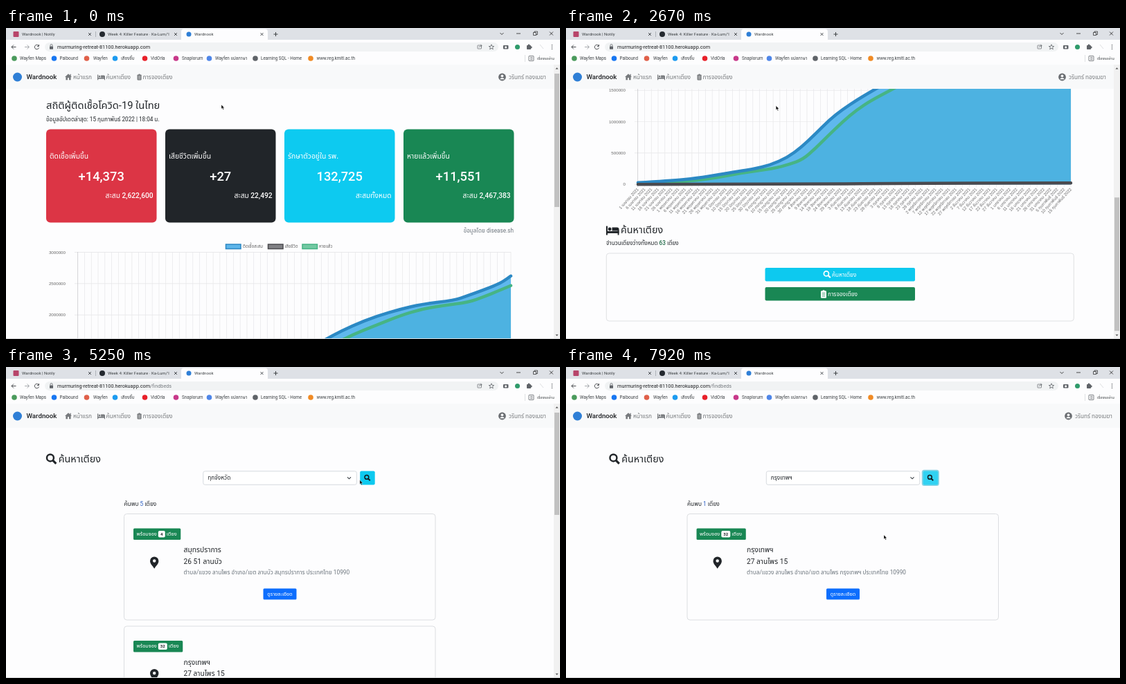
Animation, 800 px wide and 450 px high, one loop 8 s. Source, as an HTML page with a canvas:

```html
<!DOCTYPE html>
<html lang="th">
<head>
<meta charset="utf-8">
<title>Wardnook</title>
<style>
html, body { margin: 0; width: 100%; height: 100%; overflow: hidden; background: #fdfdfe; }
canvas { display: block; width: 800px; height: 450px; }
</style>
</head>
<body>
<canvas id="stage" width="800" height="450"></canvas>
<script>
const LOOP = 8000;
const ctx = document.getElementById('stage').getContext('2d');
const SANS = 'Roboto, "Noto Sans Thai", "Noto Sans", sans-serif';
const INK = '#212529', GREY = '#777a7d', CYAN = '#0dc9ef', GREEN = '#198754';
const HOST = 'murmuring-retreat-81100.herokuapp.com';

// Key times: page swap, results, list open, item picked, search pressed, filtered
const PAGE = 4330, LOADED = 4800, OPEN = 5750, PICK = 6450, PRESS = 6900, FILTER = 7050;

const POINTER = [[0, 311, 111], [420, 311, 111], [750, 303, 112], [2670, 303, 112],
  [3200, 410, 384], [3500, 432, 358], [3900, 432, 358], [4330, 551, 247], [4600, 551, 247],
  [5150, 522, 164], [5350, 500, 163], [5700, 376, 169], [6080, 376, 169], [6300, 345, 190],
  [6450, 345, 190], [6750, 518, 162], [7650, 523, 162], [7920, 459, 243]];
const SCROLL = [[1500, 0], [1580, 7], [1750, 70], [2080, 221.5], [2170, 255], [2250, 270], [2500, 370.5]];

const PROVINCES = ('ทุกจังหวัด กรุงเทพฯ กระบี่ กาญจนบุรี กาฬสินธุ์ กำแพงเพชร ขอนแก่น จันทบุรี ฉะเชิงเทรา ' +
  'ชลบุรี ชัยนาท ชัยภูมิ ชุมพร เชียงใหม่ เชียงราย ตรัง ตราด ตาก นครนายก นครปฐม').split(' ');
const MONTHS = ('มกราคม กุมภาพันธ์ มีนาคม เมษายน พฤษภาคม มิถุนายน กรกฎาคม สิงหาคม กันยายน ' +
  'ตุลาคม พฤศจิกายน ธันวาคม').split(' ');

// x position and height above the zero line
const INFECTED = [[104, 2.5], [150, 5], [190, 9], [220, 14], [250, 19], [270, 22], [295, 28], [320, 39],
  [340, 54], [360, 73], [380, 93], [400, 109], [420, 122], [440, 134], [470, 151], [500, 166], [535, 180],
  [570, 190], [600, 197], [648, 203], [665, 209], [690, 218], [708, 225], [718, 230], [729, 238]];
const RECOVERED = [[104, 1.5], [150, 2.5], [190, 6], [220, 10], [250, 16], [300, 23], [322, 29], [342, 36],
  [360, 52], [380, 72], [400, 91], [420, 108], [440, 121], [470, 137], [500, 153], [535, 167], [570, 181],
  [600, 190], [630, 195], [668, 200], [690, 208], [710, 216], [729, 224]];
const DEATHS = [[104, 0], [340, 0], [450, 1.5], [729, 2]];

function track(keys, t) {
  if (t <= keys[0][0]) return keys[0].slice(1);
  for (let i = 1; i < keys.length; i++) {
    const a = keys[i - 1], b = keys[i];
    if (t < b[0]) return a.slice(1).map((v, k) => v + (b[k + 1] - v) * (t - a[0]) / (b[0] - a[0]));
  }
  return keys[keys.length - 1].slice(1);
}

function text(str, x, y, size, color = INK, align = 'left', weight = 400, family = SANS) {
  ctx.font = `${weight} ${size}px ${family}`;
  ctx.fillStyle = color;
  ctx.textAlign = align;
  ctx.fillText(str, x, y + size * .34);
  return x + ctx.measureText(str).width;
}
function rect(x, y, w, h, fill, r = 0, stroke, line = .7) {
  ctx.beginPath();
  ctx.roundRect(x, y, w, h, r);
  if (fill) { ctx.fillStyle = fill; ctx.fill(); }
  if (stroke) { ctx.strokeStyle = stroke; ctx.lineWidth = line; ctx.stroke(); }
}
function dot(x, y, r, fill, stroke, line = 1) {
  ctx.beginPath();
  ctx.arc(x, y, r, 0, 7);
  if (fill) { ctx.fillStyle = fill; ctx.fill(); }
  if (stroke) { ctx.strokeStyle = stroke; ctx.lineWidth = line; ctx.stroke(); }
}
// SVG path data drawn at an offset
function shape(d, x, y, fill, stroke, line = 1) {
  ctx.save();
  ctx.translate(x, y);
  const p = new Path2D(d);
  if (fill) { ctx.fillStyle = fill; ctx.fill(p); }
  if (stroke) { ctx.strokeStyle = stroke; ctx.lineWidth = line; ctx.stroke(p); }
  ctx.restore();
}

function lens(x, y, s, color) {
  dot(x - s * .1, y - s * .1, s * .32, null, color, s * .16);
  shape(`M${s * .14} ${s * .14}L${s * .44} ${s * .44}`, x, y, null, color, s * .2);
}
function bed(x, y, s, color) {
  rect(x, y - s * .32, s * .11, s * .7, color);
  rect(x, y + s * .08, s, s * .16, color);
  rect(x + s * .9, y, s * .1, s * .38, color);
  dot(x + s * .28, y - s * .08, s * .13, color);
  rect(x + s * .46, y - s * .22, s * .54, s * .28, color, [0, s * .15, 0, 0]);
}
function clipboard(x, y, s, color, lines) {
  rect(x, y - s * .45, s * .76, s, color, s * .1);
  rect(x + s * .24, y - s * .55, s * .28, s * .2, color, s * .08);
  for (let i = 0; i < 3; i++) rect(x + s * .16, y - s * .17 + i * s * .21, s * .44, s * .07, lines);
}

function browser(t) {
  const findPage = t >= PAGE;
  rect(0, 0, 800, 17, '#dee1e6');
  rect(0, 17, 800, 36, '#fdfdfe');
  rect(253, 1.5, 125, 17, '#fdfdfe', [4, 4, 0, 0]);
  rect(10.5, 5, 8, 8, '#b8456a', 1);
  dot(139, 9, 4, '#24292f');
  dot(264, 9, 3.5, '#2f7fd6');
  text('Wardnook | Notily', 23, 9, 6.1, '#3c4043');
  text("Week 4: Killer Feature · Ka-Lum/'l", 147, 9, 6.1, '#3c4043');
  text('Wardnook', 272, 9, 6.1, '#3c4043');
  rect(129, 5, .7, 8, '#9aa0a6');
  for (const x of [121, 245, 369.5]) shape('M-2-2L2 2M2-2L-2 2', x, 9, null, '#3c4043', .9);
  shape('M-3 0H3M0-3V3', 389.5, 9, null, '#3c4043');
  shape('M-2.5-1L0 1.5L2.5-1', 716, 8, null, '#333', .9);
  shape('M-3 0H3', 740, 8, null, '#222', .8);
  rect(761.5, 6.5, 4, 4, null, 0, '#222');
  shape('M763 6.5V5H767.5V9.5H765.5', 0, 0, null, '#222', .7);
  shape('M-2.5-2.5L2.5 2.5M2.5-2.5L-2.5 2.5', 787.5, 8, null, '#222', .8);

  shape('M3.5 0H-3M0-3L-3 0L0 3', 11, 27.5, null, '#4a4d51');
  shape('M-3.5 0H3M0-3L3 0L0 3', 30.5, 27.5, null, '#a8abaf');
  shape('M2.5-2A3.2 3.2 0 1 0 3.1 1M3-3.5V-1H.5', 44.5, 27.5, null, '#4a4d51');
  rect(56, 21, 655, 13, '#f1f3f4', 6.5);
  rect(63, 26.5, 5, 4.2, '#5f6368', .5);
  shape('M64 26.5V25A1.5 1.5 0 0 1 67 25V26.5', 0, 0, null, '#5f6368', .8);
  const end = text(HOST, 74, 27.5, 7.3, '#202124');
  if (findPage) text('/findbeds', end, 27.5, 7.3, '#777b80');
  rect(681, 25, 5.5, 5, null, .5, '#5f6368');
  shape('M683 28Q684 25.5 687 25.5M685.5 24L687.3 25.5L685.5 27', 0, 0, null, '#5f6368', .7);
  shape('M0-3.7L1-1.1L3.7-1L1.6.7L2.3 3.3L0 1.8L-2.3 3.3L-1.6.7L-3.7-1L-1-1.1Z', 701, 27.5, null, '#5f6368', .8);
  rect(718, 25, 7.5, 5.5, '#5f6368', 1);
  dot(721.7, 27.8, 1.6, '#fff');
  dot(738.5, 27.5, 3.5, findPage && t < LOADED ? '#9a9da1' : '#2f9b6b');
  rect(752, 25, 6, 6, '#5f6368', .8);
  dot(755, 24.8, 1.4, '#5f6368');
  dot(758.3, 28, 1.4, '#5f6368');
  shape('M-2-3L3 3', 773, 27, null, '#d5d7da', .8);
  for (const y of [24.7, 27.5, 30.3]) dot(788.5, y, .8, '#5f6368');

  const marks = [[12, '#4a9a5c', 20, 'Wayfen Maps'], [69.5, '#1877f2', 77.5, 'Palbound'],
    [116.5, '#e0604a', 126, 'Wayfen'], [157.5, '#1d9bf0', 166, 'เสียงจิ๊บ'], [200.5, '#e8202a', 209, 'VidOrla'],
    [245.5, '#c8398a', 254, 'Snaplorum'], [293.5, '#4f86e8', 302, 'Wayfen แปลภาษา'],
    [360, '#5f6368', 368, 'Learning SQL - Home'], [440, '#f08a24', 448.5, 'www.reg.kmitl.ac.th']];
  for (const [x, color, tx, label] of marks) {
    dot(x, 44, 3.8, color);
    text(label, tx, 44, 6.3, '#3c4043');
  }
  rect(749, 39, .7, 10, '#d0d3d7');
  rect(755, 40.5, 7, 7, null, .5, '#5f6368', .8);
  shape('M757 42.5H760.5M757 44H760.5M757 45.5H760.5', 0, 0, null, '#5f6368', .6);
  text('เรื่องรออ่าน', 767, 44, 5.5, '#3c4043');
}

function navbar(dx) {
  rect(0, 53, 800, 35, '#f8f9fa');
  dot(16.5, 71, 6.5, '#2f7fd6');
  text('Wardnook', 29.5, 70.5, 9.7, '#1f2124', 'left', 500);
  shape('M0-4.8L5 0H3.6V4.2H1V1H-1V4.2H-3.6V0H-5ZM2.5-4.3H3.8V-1H2.5Z', 90, 71, GREY);
  text('หน้าแรก', 97, 71, 8.3, GREY);
  bed(132, 71, 11, GREY);
  text('ค้นหาเตียง', 144.5, 71, 8.3, GREY);
  clipboard(189.5, 71, 8, GREY, '#f8f9fa');
  text('การจองเตียง', 197.5, 71, 8.3, GREY);
  dot(716.5 + dx, 71, 5.4, '#6b6e72');
  dot(716.5 + dx, 69.3, 1.9, '#f8f9fa');
  shape('M-3.2 3.2A3.3 2.8 0 0 1 3.2 3.2Z', 716.5 + dx, 71, '#f8f9fa');
  text('วรินทร์ ทองเมฆา', 726 + dx, 71, 8.2, GREY);
}

function scrollbar(top, height) {
  rect(791, 53, 9, 397, '#f1f1f1');
  rect(792, top, 7, height, '#c1c1c1');
  shape('M-2 1L0-1.3L2 1Z', 795.5, 58.5, '#505050');
  shape('M-2-1L0 1.3L2-1Z', 795.5, 444.5, '#505050');
}

function curve(points, base) {
  const p = points.map(([x, h]) => [x, base - h]);
  ctx.lineTo(...p[0]);
  for (let i = 1; i < p.length - 1; i++) {
    const [x, y] = p[i], [nx, ny] = p[i + 1];
    ctx.quadraticCurveTo(x, y, (x + nx) / 2, (y + ny) / 2);
  }
  ctx.lineTo(...p[p.length - 1]);
}
function series(points, base, fill, stroke) {
  if (fill) {
    ctx.beginPath();
    ctx.moveTo(104, base);
    curve(points, base);
    ctx.lineTo(729, base);
    ctx.fillStyle = fill;
    ctx.fill();
  }
  if (!stroke) return;
  ctx.beginPath();
  curve(points, base);
  ctx.lineWidth = 4.5;
  ctx.lineCap = ctx.lineJoin = 'round';
  ctx.strokeStyle = stroke;
  ctx.stroke();
  ctx.lineCap = 'butt';
  ctx.lineJoin = 'miter';
}

function chart() {
  const base = 596.8, step = 45.4, gap = 625.3 / 64, font = '"Liberation Sans", "Noto Sans Thai", sans-serif';
  [['ติดเชื้อสะสม', 317.5, 342, '#5db5ea', '#2c87c2'], ['เสียชีวิต', 378.5, 402.5, '#808084', '#4b4b4f'],
    ['หายแล้ว', 428, 452, '#72c9a2', '#45b384']].forEach(([label, x, tx, fill, stroke]) => {
    rect(x, 313, 21.5, 6.5, fill, 0, stroke, 1.5);
    text(label, tx, 316, 6.1, '#666', 'left', 400, font);
  });
  for (let i = 0; i <= 6; i++) {
    rect(99, base - i * step - .35, 630, .7, '#e3e3e5');
    text(String(i * 500000), 86, base - i * step, 6.2, '#666', 'right', 400, font);
  }
  for (let i = 0; i <= 64; i++) {
    const x = 103.7 + i * gap;
    rect(x - .35, 324, .7, base - 320, i ? '#e6e6e8' : '#c4c4c6');
    const day = new Date(2021, 3, 1 + i * 5);
    ctx.save();
    ctx.translate(x, base + 6);
    ctx.rotate(-.83);
    text(`${day.getDate()} ${MONTHS[day.getMonth()]} ${day.getFullYear()}`, 0, 0, 6, '#666', 'right', 400, font);
    ctx.restore();
  }
  series(INFECTED, base, '#5fb8ed');
  series(RECOVERED, base, '#4db2e1', '#46b484');
  series(INFECTED, base, null, '#2c89c4');
  series(DEATHS, base, null, '#4a4a4f');
}

function home(t, cx, cy) {
  const [scroll] = track(SCROLL, t);
  ctx.save();
  ctx.translate(0, -scroll);
  text('สถิติผู้ติดเชื้อโควิด-19 ในไทย', 58, 112.4, 14.7);
  text('ข้อมูลอัปเดตล่าสุด: 15 กุมภาพันธ์ 2022 | 18:04 น.', 58, 132, 8.2);
  [['#dc3545', 'ติดเชื้อเพิ่มขึ้น', '+14,373', 'สะสม 2,622,600'],
    ['#212529', 'เสียชีวิตเพิ่มขึ้น', '+27', 'สะสม 22,492'],
    ['#0dcaf0', 'รักษาตัวอยู่ใน รพ.', '132,725', 'สะสมทั้งหมด'],
    ['#198754', 'หายแล้วเพิ่มขึ้น', '+11,551', 'สะสม 2,467,383']].forEach(([color, label, value, total], i) => {
    const x = 58 + i * 172;
    rect(x, 146.5, 159.5, 135, color, 6);
    text(label, x + 5, 185, 10.4, '#fff', 'left', 500);
    text(value, x + 79.7, 214.5, 18.3, '#fff', 'center', 500);
    text(total, x + 154.5, 242.5, 10.2, '#fff', 'right', 500);
  });
  text('ข้อมูลโดย disease.sh', 733, 293, 8.2, '#6c757d', 'right');
  chart();
  bed(58, 663, 18.5, INK);
  text('ค้นหาเตียง', 79, 663, 14.3);
  let x = text('จำนวนเตียงว่างทั้งหมด ', 58, 682, 8.2);
  x = text('63', x, 682, 8.2, '#226b49', 'left', 500);
  text(' เตียง', x, 682, 8.2);
  rect(58.3, 696.5, 675, 98, null, 4, '#dcdee0', .9);
  const over = y => cx > 288 && cx < 504 && cy + scroll > y && cy + scroll < y + 20;
  rect(287.5, 717.5, 216.5, 19.5, over(717.5) ? '#31d2f2' : CYAN, 2);
  lens(377, 727, 11, '#fff');
  text('ค้นหาเตียง', 384, 727.5, 8.3, '#fff');
  rect(287.5, 745.5, 216.5, 19.5, over(745.5) ? '#157347' : GREEN, 2);
  clipboard(368, 755.5, 10.5, '#fff', GREEN);
  text('การจองเตียง', 378, 755.5, 8.3, '#fff');
  ctx.restore();
  navbar(0);
  scrollbar(66 + scroll * .484, 193);
}

function bedCard(y, beds, province, street, address) {
  const x = 170.5;
  rect(x, y, 449.5, 153.5, '#fdfdfe', 4, '#d9dbde', .9);
  ctx.font = `500 7.3px ${SANS}`;
  const before = ctx.measureText('พร้อมจอง').width, after = ctx.measureText('เตียง').width;
  const chip = beds > 9 ? 13 : 10;
  rect(x + 13.5, y + 21, before + after + chip + 14, 16.5, GREEN, 1.5);
  let pos = text('พร้อมจอง', x + 18, y + 29, 7.3, '#fff', 'left', 500) + 2;
  rect(pos, y + 24.5, chip, 9.5, '#fff', 2);
  text(String(beds), pos + chip / 2, y + 29, 6, INK, 'center', 700);
  text('เตียง', pos + chip + 2, y + 29, 7.3, '#fff', 'left', 500);
  shape('M0 8.7C-2 5-6.2 2-6.2-2.3A6.2 6.2 0 0 1 6.2-2.3C6.2 2 2 5 0 8.7Z', x + 43.7, y + 70.5, INK);
  dot(x + 43.7, y + 68, 2.2, '#fdfdfe');
  text(province, x + 86, y + 52, 10.3);
  text(street, x + 86, y + 69, 10.2);
  text(address, x + 86, y + 85, 8.3, '#6c757d');
  rect(x + 201, y + 108, 48, 16, '#0d6efd', 1.5);
  text('ดูรายละเอียด', x + 225, y + 116, 7.2, '#fff', 'center');
}

function dropdown(cy) {
  const row = 12.9, active = Math.max(0, Math.floor((cy - 170.5) / row));
  ctx.save();
  ctx.shadowColor = 'rgba(0,0,0,.35)';
  ctx.shadowBlur = 5;
  ctx.shadowOffsetY = 2;
  rect(285.5, 170.5, 221, 259.5, '#fff');
  ctx.restore();
  rect(285.5, 170.5, 221, 259.5, null, 0, '#777', .8);
  PROVINCES.forEach((name, i) => {
    if (i === active) rect(286, 170.8 + i * row, 211.5, row, '#1e90ff');
    text(name, 291.5, 177.3 + i * row, 8.3, i === active ? '#fff' : INK);
  });
  rect(497.5, 171, 8.5, 258.5, '#f1f1f1');
  rect(498, 180, 7.5, 61.5, '#c1c1c1');
  shape('M-2 1L0-1.3L2 1Z', 501.7, 175.5, '#505050');
  shape('M-2-1L0 1.3L2-1Z', 501.7, 425, '#505050');
}

function find(t, cx, cy) {
  const loaded = t >= LOADED, filtered = t >= FILTER, pressed = t >= PRESS;
  const bar = loaded && !filtered, dx = bar ? 0 : 4.5;
  const focused = t >= OPEN - 60 && !pressed;
  const bangkok = y => bedCard(y, 32, 'กรุงเทพฯ', '27 ลานไพร 15',
    'ตำบล/แขวง ลานไพร อำเภอ/เขต ลานไพร กรุงเทพฯ ประเทศไทย 10990');
  ctx.save();
  ctx.translate(dx, 0);
  lens(65.5, 133, 15.5, INK);
  text('ค้นหาเตียง', 75.8, 133, 14.3);
  if (focused) rect(283.5, 149.5, 224, 22, '#c5dcfd', 3);
  rect(284.8, 150.8, 221.5, 19.5, '#fff', 2.5, focused ? '#86b7fe' : '#d3d7dc', .9);
  text(PROVINCES[t < PICK ? 0 : 1], 291.3, 160.5, 8.3);
  shape('M-2.5-1.2L0 1.3L2.5-1.2', 495.5, 160.5, null, '#343a40', 1.1);
  const hover = cx > 511 + dx && cx < 533 + dx && cy > 150 && cy < 170;
  if (pressed) rect(509.3, 148.8, 25, 23.3, '#86d4e5', 3.5);
  rect(511.2, 150.5, 21.5, 20, hover || pressed ? '#31d2f2' : CYAN, 2);
  lens(521.8, 160.3, 9, '#10181c');
  let x = text('ค้นพบ ', 170.5, 198, 8.3);
  x = text(filtered ? '1' : loaded ? '5' : '0', x, 198, 8.3, '#2b5fc4');
  text(' เตียง', x, 198, 8.3);
  if (filtered) bangkok(212.5);
  else if (loaded) {
    bedCard(212.5, 4, 'สมุทรปราการ', '26 51 ลานบัว',
      'ตำบล/แขวง ลานไพร อำเภอ/เขต ลานบัว สมุทรปราการ ประเทศไทย 10990');
    bangkok(375);
  }
  ctx.restore();
  navbar(bar ? 0 : 9);
  if (bar) scrollbar(66, 148);
  if (t >= OPEN && t < PICK) dropdown(cy);
}

function draw(t) {
  const [cx, cy] = track(POINTER, t);
  rect(0, 0, 800, 450, '#fdfdfe');
  (t < PAGE ? home : find)(t, cx, cy);
  if (t >= 3500 && t < PAGE) {
    rect(0, 440, 165, 10, '#dee1e6', [0, 2, 0, 0]);
    text(HOST + '/findbeds', 4, 445, 6.3, '#55595e');
  }
  browser(t);
  rect(0, 449, 800, 1, '#d4d5d7');
  shape('M0 0V6L1.4 4.8L2.5 7.3L3.5 6.8L2.5 4.4H4.3Z', cx, cy, '#000', '#fff', .4);
}

function frame() {
  draw(performance.now() % LOOP);
  requestAnimationFrame(frame);
}
frame();
</script>
</body>
</html>
```
